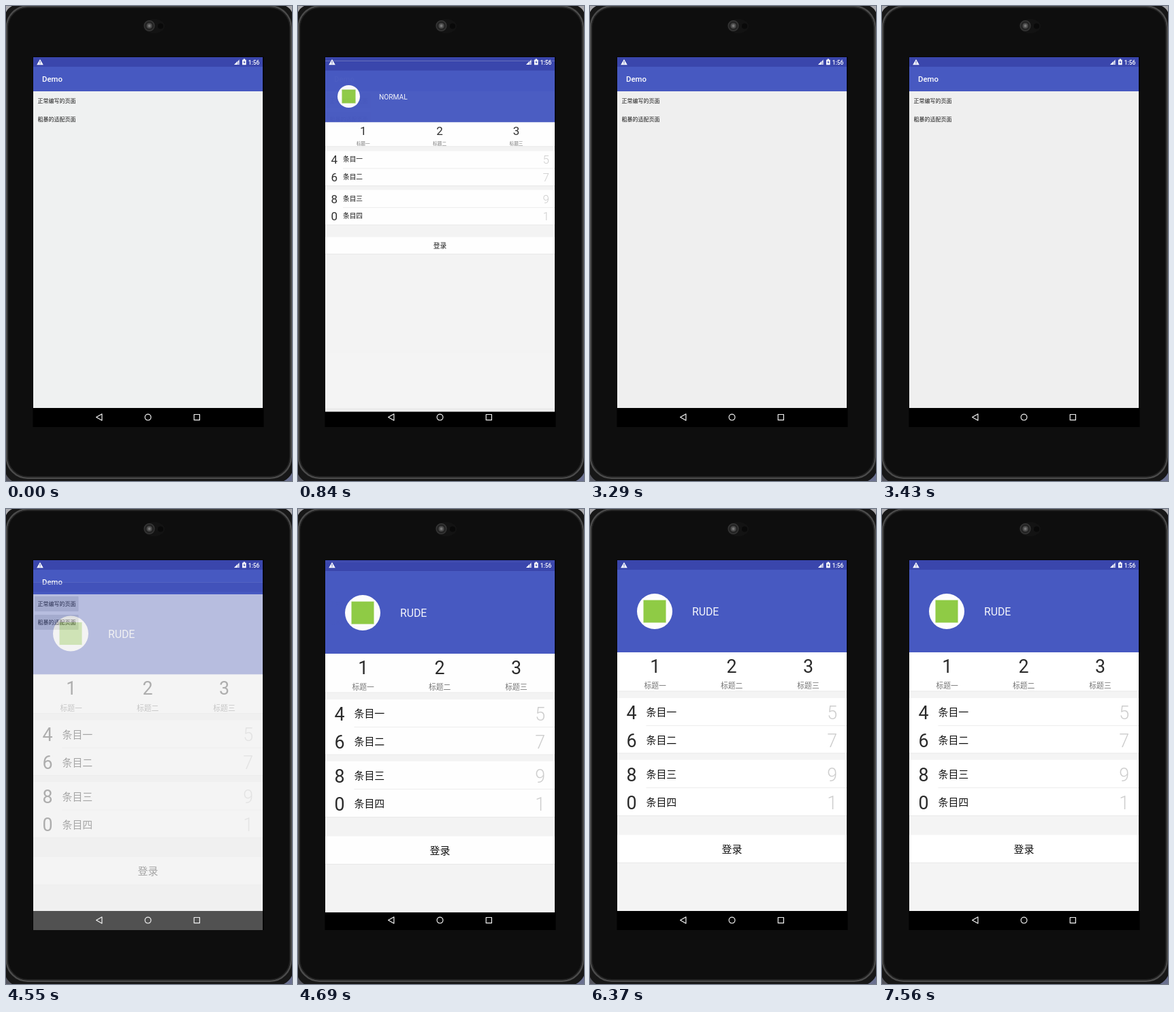
These frames come from a looping animation (420x696 px, 7.63 s). An HTML page:

```html
<!DOCTYPE html>
<html lang="zh">
<head>
<meta charset="utf-8">
<title>Demo</title>
<style>
  html, body { margin: 0; width: 100%; height: 100%; overflow: hidden; background: #0e0e0e; }
  svg { display: block; width: 420px; height: 696px; }
  text { font-family: Roboto, "Noto Sans CJK SC", "Noto Sans CJK", sans-serif; }
  .cjk { font-family: "Noto Sans CJK SC", "Noto Sans CJK", "Noto Sans CJK JP", sans-serif; }
</style>
</head>
<body>
<svg id="stage" viewBox="0 0 420 696" xmlns="http://www.w3.org/2000/svg"></svg>
<script>
const LOOP = 7630, STEP = 70;
const BLUE = '#4759c1', DARK = '#3a46ac';

const rect = (x, y, w, h, fill, extra = '') =>
  `<rect x="${x}" y="${y}" width="${w}" height="${h}" fill="${fill}" ${extra}/>`;
const circle = (x, y, r, fill, extra = '') =>
  `<circle cx="${x}" cy="${y}" r="${r}" fill="${fill}" ${extra}/>`;
const path = (d, fill, extra = '') => `<path d="${d}" fill="${fill}" ${extra}/>`;

// Text centred vertically on y.
function label(str, x, y, size, fill, anchor = 'start', weight = 400) {
  const cjk = str.charCodeAt(0) > 0x2fff;
  const base = y + size * (cjk ? 0.37 : 0.355);
  return `<text x="${x}" y="${base.toFixed(2)}" font-size="${size}" fill="${fill}"` +
    ` text-anchor="${anchor}" font-weight="${weight}"${cjk ? ' class="cjk"' : ''}>${str}</text>`;
}

const NORMAL = {
  name: 'NORMAL', nameX: 119, nameSize: 10.2, avatar: [74.5, 127, 16.5, 20],
  head: 165, numY: 177.3, capY: 195.7, capSize: 6.7, tabsEnd: 200.5,
  groups: [[207, 258], [264, 315.5]], rows: [219.5, 245.5, 277, 302.7],
  numSize: 17, numX: 48.5, itemX: 66, itemSize: 9.7, endX: 369,
  button: [333, 358], buttonSize: 9.7
};
const RUDE = {
  name: 'RUDE', nameX: 150, nameSize: 15.8, avatar: [95, 150, 26, 33],
  head: 210, numY: 230, capY: 259.3, capSize: 10.8, tabsEnd: 267,
  groups: [[277, 358], [367.5, 449.5]], rows: [298, 339, 389, 430],
  numSize: 26.8, numX: 53.5, itemX: 82.5, itemSize: 14.9, endX: 363,
  button: [477.5, 518.5], buttonSize: 14.9
};

function page(p) {
  const [ax, ay, ar, side] = p.avatar;
  let s = rect(40, 75, 337, 514, '#f4f4f4') + rect(40, 75, 337, 14.5, DARK) +
    rect(40, 89, 337, p.head - 89, BLUE) + circle(ax, ay, ar, '#fdfdfd') +
    rect(ax - side / 2, ay - side / 2, side, side, '#8fcb45') +
    label(p.name, p.nameX, ay + 0.5, p.nameSize, '#f4f5fb');

  const band = (top, end) => rect(40, top, 337, end - top, '#fff') +
    rect(40, end - 0.5, 337, 0.8, '#e4e4e4');

  s += band(p.head, p.tabsEnd);
  ['一', '二', '三'].forEach((c, i) => {
    const x = 95.7 + i * 112.4;
    s += label(String(i + 1), x, p.numY, p.numSize, '#2b2b2b', 'middle') +
      label('标题' + c, x, p.capY, p.capSize, '#757575', 'middle');
  });

  p.groups.forEach(([top, end]) => {
    s += band(top, end) + rect(p.itemX, (top + end) / 2 - 0.4, 377 - p.itemX, 0.8, '#e9e9e9');
  });
  p.rows.forEach((y, i) => {
    s += label('4680'[i], p.numX, y, p.numSize, '#2b2b2b') +
      label('条目' + '一二三四'[i], p.itemX, y - 0.3, p.itemSize, '#111', 'start', 500) +
      label('5791'[i], p.endX, y, p.numSize, '#cdcdcd', 'end', 300);
  });

  const [top, end] = p.button;
  return s + band(top, end) +
    label('登录', 208.5, (top + end) / 2, p.buttonSize, '#111', 'middle', 500);
}

const device =
  rect(0, 0, 420, 696, '#171717') +
  path('M0 0H9Q3 3 0 9Z', '#a9a9ad') + path('M420 0H411Q417 3 420 9Z', '#a9a9ad') +
  path('M0 696V686Q3 692 9 696Z', '#55565f') + path('M420 696V684Q416 692 408 696Z', '#6b7190') +
  rect(0.8, 0.3, 418, 691.5, '#0e0e0e', 'rx="31" stroke="#4b4b4b" stroke-width="2.4"') +
  rect(2.8, 2.3, 414, 687.5, 'none', 'rx="29" stroke="#242424" stroke-width="1.4"') +
  '<ellipse cx="217" cy="29.5" rx="16" ry="10.5" fill="#131313"/>' +
  circle(227, 29.5, 4, '#090909') +
  circle(210.5, 29, 7.4, '#242424', 'stroke="#383838" stroke-width="1.2"') +
  circle(210.5, 29, 4, '#4c4c4c') + circle(210.5, 29, 2, '#777');

const list =
  rect(40, 75, 337, 514, '#efefef', 'id="listBg"') +
  rect(40, 75, 337, 14.5, DARK) + rect(40, 89, 337, 36, BLUE) +
  label('Demo', 53, 107.3, 11.4, '#fff', 'start', 500) +
  '<g id="buttons" opacity="0">' +
  rect(42, 128, 64.5, 22, '#d3d4d5', 'rx="1"') + rect(42, 155, 64.5, 22, '#d3d4d5', 'rx="1"') +
  '</g>' +
  label('正常编写的页面', 46.5, 138.7, 8, '#1b1b1b', 'start', 500) +
  label('粗暴的适配页面', 46.5, 165.7, 8, '#1b1b1b', 'start', 500);

const line = 'stroke="#f2f2f2" stroke-width="1.2" stroke-linejoin="round"';
const icons =
  path('M50 78L54.8 86.2H45.2Z', '#fff') +
  rect(49.5, 80.8, 1, 2.7, DARK) + rect(49.5, 84.2, 1, 1, DARK) +
  path('M343 78V86H335Z', '#8d94d0') + path('M340 81V86H335Z', '#fff') +
  rect(341, 80, 1.2, 3.7, '#fff') + rect(341, 84.5, 1.2, 1.4, '#fff') +
  path('M347 78.7H348.6V77.6H351V78.7H352.6V86.2H347Z', '#fff') +
  path('M350.3 79.8L348.3 82.8H349.6V85L351.4 82H350.3Z', DARK) +
  label('1:56', 372.3, 82.6, 8.4, '#fff', 'end', 500) +
  path('M140.9 597.8V607.2L132.6 602.5Z', 'none', line) +
  circle(208.5, 602.6, 4.4, 'none', line) +
  rect(276.2, 598.5, 8.2, 8.2, 'none', line);

document.getElementById('stage').innerHTML =
  '<defs><clipPath id="screen"><rect x="40" y="75" width="337" height="542"/></clipPath></defs>' +
  device + rect(39.5, 74.5, 339, 542.5, '#000') + list +
  `<g clip-path="url(#screen)"><g id="normal">${page(NORMAL)}</g><g id="rude">${page(RUDE)}</g></g>` +
  icons;

const $ = id => document.getElementById(id);
const clamp = v => Math.max(0, Math.min(1, v));

const RISE = 43;
const visits = [
  { el: $('normal'), open: 722, close: 2940 },
  { el: $('rude'), open: 4531, close: Infinity }
];

// Opening decelerates upward while fading in; closing accelerates downward while fading out.
function pose(t, { open, close }) {
  if (t < close) {
    return {
      y: RISE * (1 - clamp((t - open) / 350)) ** 5,
      alpha: 1 - (1 - clamp((t - open) / 200)) ** 4
    };
  }
  return {
    y: RISE * clamp((t - close) / 250) ** 4,
    alpha: 1 - clamp((t - close - 100) / 150)
  };
}

function draw(t) {
  let pressed = false;
  for (const v of visits) {
    const { y, alpha } = pose(t, v);
    v.el.setAttribute('transform', `translate(0 ${y.toFixed(2)})`);
    v.el.setAttribute('opacity', alpha.toFixed(3));
    v.el.setAttribute('visibility', alpha > 0 ? 'visible' : 'hidden');
    if (t > v.open - STEP && t < v.open + 350) pressed = true;
  }
  $('buttons').setAttribute('opacity', pressed ? 1 : 0);
  $('listBg').setAttribute('fill', t < visits[0].open ? '#eff1f1' : '#efefef');
}

const start = performance.now();
function tick() {
  const t = (performance.now() - start) % LOOP;
  draw(Math.floor(t / STEP) * STEP);
  requestAnimationFrame(tick);
}
draw(0);
requestAnimationFrame(tick);
</script>
</body>
</html>
```
